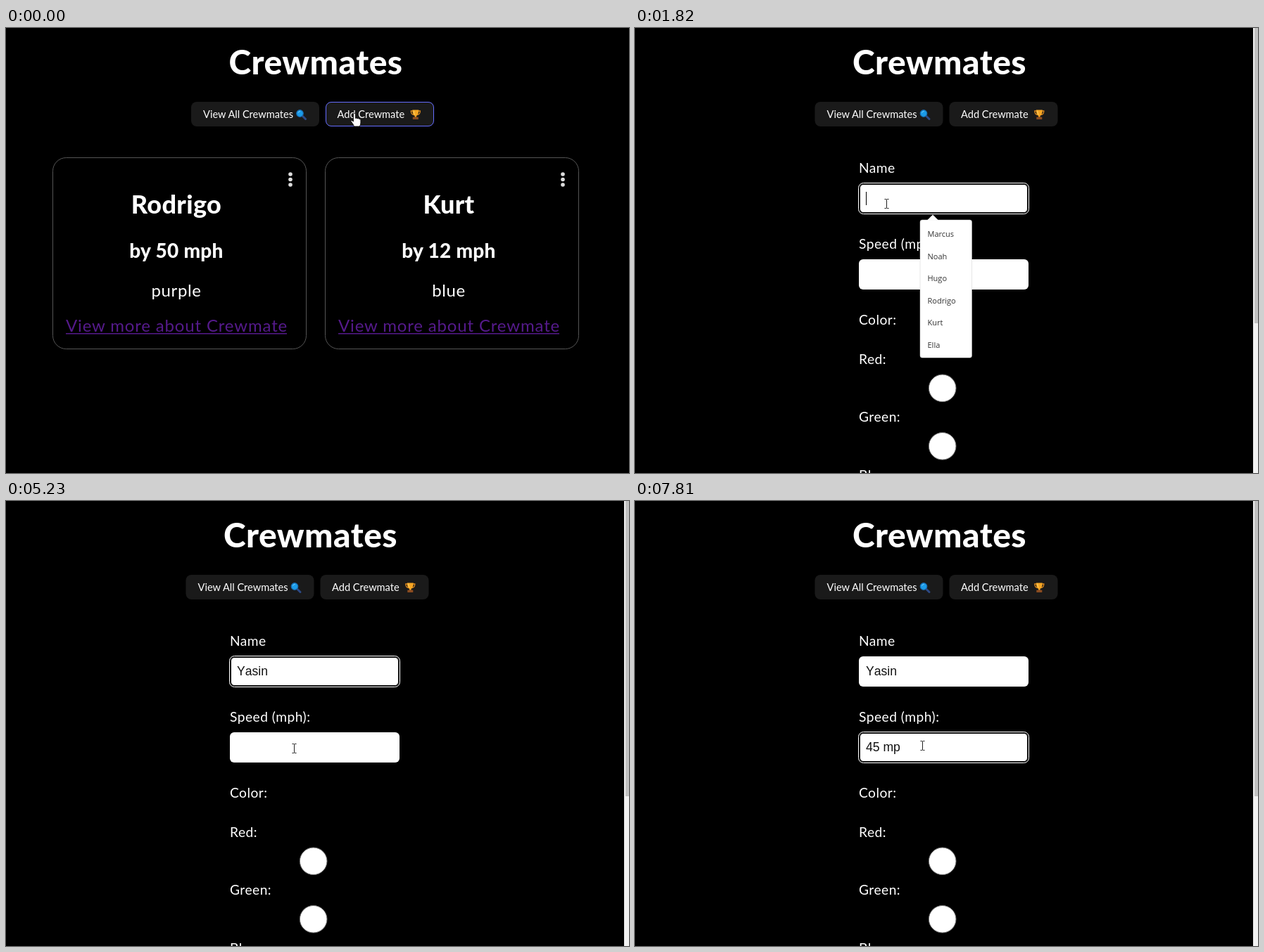
These frames come from a looping animation (885x633 px, 8 s). An HTML page:

```html
<!DOCTYPE html>
<html lang="en">
<head>
<meta charset="utf-8">
<title>Crewmates</title>
<style>
html, body { margin: 0; width: 100%; height: 100%; overflow: hidden; background: #000; }
svg { display: block; }
text { font: 19.2px Lato, sans-serif; letter-spacing: .025em; fill: #fff; }
.mid { text-anchor: middle; }
.h1 { font-size: 48px; font-weight: 800; letter-spacing: .01em; }
.h2 { font-size: 36px; font-weight: 800; letter-spacing: .01em; }
.h3 { font-size: 28px; font-weight: 800; letter-spacing: .01em; }
.p { font-size: 24px; }
.link { font-size: 24px; letter-spacing: .035em; fill: #551a8b; }
.btn { font-size: 14.6px; letter-spacing: 0; }
.typed { font: 17.6px "Liberation Sans", Arial, sans-serif; letter-spacing: 0; font-kerning: none; fill: #111; }
.item { font: 11px "Open Sans", sans-serif; letter-spacing: 0; fill: #333; }
</style>
</head>
<body>
<svg id="stage" width="885" height="633" viewBox="0 0 885 633">
  <g id="head"></g>
  <g id="list"></g>
  <g id="form"></g>
  <g id="live"></g>
  <g id="cursor"></g>
</svg>
<script>
const LOOP = 8000, OPEN = 250;
const $ = id => document.getElementById(id);
const text = (cls, x, y, s) => `<text class="${cls}" x="${x}" y="${y}">${s}</text>`;
const rect = (x, y, w, h, r, fill, more = '') =>
  `<rect x="${x}" y="${y}" width="${w}" height="${h}" rx="${r}" fill="${fill}" ${more}/>`;
const dot = (x, y, r, fill, more = '') => `<circle cx="${x}" cy="${y}" r="${r}" fill="${fill}" ${more}/>`;
const path = (d, fill, more = '') => `<path d="${d}" fill="${fill}" ${more}/>`;

// Steps are [time, ...values]; the latest one reached holds.
const at = (steps, t) => steps.filter(s => s[0] <= t).pop();

const lens =
  path('M421.5 125.5l4 4', 'none', 'stroke="#2c4a86" stroke-width="3" stroke-linecap="round"') +
  dot(417.5, 121.5, 4.8, '#1b9be8', 'stroke="#1769ad" stroke-width="1.2"') +
  path('M415 120.5q1-2 3-2', 'none', 'stroke="#7fd0ff"');
const trophy = '<g transform="translate(-.7)">' +
  path('M578.5 118h-2.5q0 5 4 5.5M586.5 118h2.5q0 5-4 5.5', 'none', 'stroke="#e08a1e" stroke-width="1.3"') +
  path('M578 116.5h9q0 7-3.3 8.5v2h-2.4v-2q-3.3-1.5-3.3-8.5z', '#f6a623') +
  path('M580 117.5q0 4 1.5 6', 'none', 'stroke="#ffd36b"') +
  rect(578.5, 126.5, 8, 3.5, 0.5, '#8a4b20') + '</g>';

$('head').innerHTML =
  text('h1 mid', 440, 66, 'Crewmates') +
  rect(263, 105, 182, 35, 8, '#1a1a1a') + text('btn', 280, 128, 'View All Crewmates') + lens +
  rect(454, 105, 154, 35, 8, '#1a1a1a') +
  rect(454.5, 105.5, 153, 34, 7.5, 'none', 'id="hover" stroke="#646cff"') +
  text('btn', 470.5, 128, 'Add Crewmate') + trophy;

const card = (x, name, speed, color) => `<g transform="translate(${x})">` +
  rect(0.5, 184.5, 360, 272, 19, 'none', 'stroke="#555"') +
  [208, 215.5, 223].map(y => dot(338, y, 2.8, '#ddd')).join('') +
  text('h2 mid', 176, 264, name) +
  text('h3 mid', 176, 327, `by ${speed} mph`) +
  text('p mid', 176, 382, color) +
  text('link mid', 176.5, 432, 'View more about Crewmate') +
  rect(19, 434, 314, 1.5, 0, '#551a8b') + '</g>';
$('list').innerHTML = card(66, 'Rodrigo', 50, 'purple') + card(453, 'Kurt', 12, 'blue');

const fields = [221, 329];
$('form').innerHTML =
  [['Name', 206], ['Speed (mph):', 314], ['Color:', 422], ['Red:', 478], ['Green:', 560], ['Blue:', 643]]
    .map(([s, y]) => text('', 318, y, s)).join('') +
  fields.map(y => rect(318, y, 241, 43, 6, '#fff')).join('') +
  [512.3, 594.8].map(y => dot(436.7, y, 19.3, '#fff', 'stroke="#767676"')).join('') +
  rect(878, 0, 7, 633, 0, '#f1f1f1') + rect(880, 0, 5, 420, 0, '#c1c1c1');

const hints = [
  ['Marcus', 'Noah', 'Hugo', 'Rodrigo', 'Kurt', 'Ella'],
  ['12 mph', '60 mph', '50 mph', '90 mph']
];
const name = [[0, ''], [3590, 'Y'], [3830, 'Ya'], [4110, 'Yasi'], [4250, 'Yasin']];
const speed = [[0, ''], [6550, '4'], [6700, '45'], [6850, '45 '], [7130, '45 m'], [7250, '45 mp']];
const focus = [[0, -1], [1410, 0], [5370, 1]];
const popup = [[0, -1], [1540, 0], [3710, -1], [5500, 1], [6700, -1]];
const caret = [[0, 0], [1410, 1], [1970, 0], [2590, 1], [3020, 0], [3590, 1], [4810, 0],
  [5370, 1], [5900, 0], [6430, 1], [7810, 0]];
const pointer = [
  [0, 'hand', 495, 121], [370, 'arrow', 470, 172], [490, 'arrow', 412, 290], [610, 'arrow', 338, 420],
  [730, 'arrow', 287, 497], [880, 'arrow', 261, 454], [1030, 'arrow', 284, 365], [1150, 'arrow', 334, 284],
  [1270, 'beam', 358.5, 252.5], [1410, 'beam', 358.5, 250], [1820, 'beam', 357.5, 250],
  [4670, 'beam', 358, 250], [4810, 'beam', 404.5, 367], [4950, 'arrow', 410, 399],
  [5090, 'beam', 410.5, 361], [5230, 'beam', 409.5, 352], [5370, 'beam', 408.5, 348]
];
const shapes = {
  arrow: path('M.5 .5v15.5l3.6-3.4 2.4 5.6 2.3-1-2.4-5.4h5z', '#fff', 'stroke="#000"'),
  hand: path('M-1.5 1.5q1.5-2.5 3 0v6q1.4-1.2 2.6 .4 1.5-1 2.6 .6 2-.6 2.2 1.5v4q-.2 3-1.7 5h-7.7q-1-3-4.5-7.5 0-2.4 3.5 .5z',
    '#fff', 'stroke="#000" stroke-width=".8"'),
  beam: path('M-3-6.5h2q1 0 1 1 0-1 1-1h2M0-6v12M-3 6.5h2q1 0 1-1 0 1 1 1h2', 'none', 'stroke="#222"')
};

const width = s => {
  const adv = { Y: .667, s: .5, i: .222, ' ': .278, m: .833 };
  return 17.6 * [...s].reduce((sum, c) => sum + (adv[c] || .556), 0);
};

function ring(y) {
  return rect(317.5, y - .5, 242, 44, 7, '#101010', 'stroke="#fff"') +
    rect(320, y + 2, 237, 39, 4.5, '#fff');
}

function menu(y, items) {
  const h = items.length * 31.5 + 7;
  return rect(405, y, 73.5, h, 3, '#fff', 'stroke="#ccc" stroke-width=".5"') +
    path(`M415 ${y + .5}l8-8 8 8z`, '#fff') +
    items.map((s, i) => text('item', 415.5, y + 24 + i * 31.5, s)).join('');
}

function live(t) {
  const values = [at(name, t)[1], at(speed, t)[1]];
  const active = at(focus, t)[1], open = at(popup, t)[1];
  let out = active < 0 ? '' : ring(fields[active]);
  values.forEach((s, i) => out += text('typed', 328, fields[i] + 27, s));
  if (active >= 0 && at(caret, t)[1])
    out += rect(Math.floor(328 + width(values[active])), fields[active] + 12, 1, 19, 0, '#000');
  if (open >= 0) out += menu(fields[open] + 52, hints[open]);
  return out;
}

let shown;
function draw(now) {
  const t = now % LOOP, inForm = t >= OPEN;
  const [, kind, x, y] = at(pointer, t);
  const body = inForm ? live(t) : '';
  const mark = `<g transform="translate(${x} ${y})">${shapes[kind]}</g>`;
  if (shown !== inForm + body + mark) {
    shown = inForm + body + mark;
    $('head').setAttribute('transform', `translate(${inForm ? -7.5 : 0})`);
    $('hover').style.display = t < 370 ? '' : 'none';
    $('list').style.display = inForm ? 'none' : '';
    $('form').style.display = inForm ? '' : 'none';
    $('live').innerHTML = body;
    $('cursor').innerHTML = mark;
  }
  requestAnimationFrame(draw);
}
draw(0);
</script>
</body>
</html>
```
